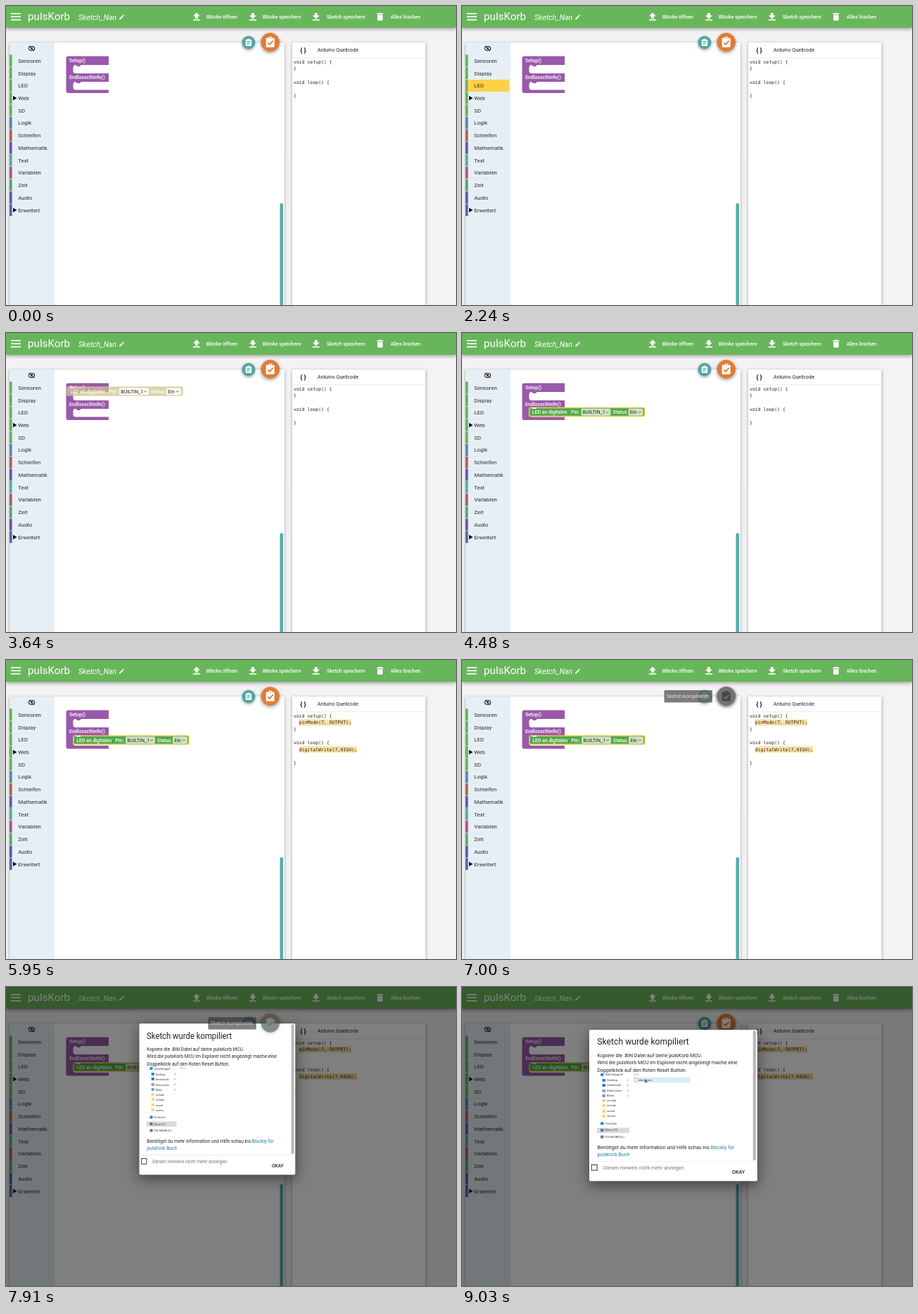
Animation of 640 by 426 pixels, one loop 9.1 s. Source, as an HTML page with a canvas:

```html
<!DOCTYPE html>
<html lang="de">
<head>
<meta charset="utf-8">
<title>Block-Editor</title>
<style>
html, body { margin: 0; width: 100%; height: 100%; overflow: hidden; background: #f3f3f3; }
canvas { display: block; }
</style>
</head>
<body>
<canvas id="stage" width="640" height="426"></canvas>
<script>
const ctx = document.getElementById('stage').getContext('2d');
const LOOP = 9100;
const SANS = 'Roboto, "Open Sans", sans-serif';
const MONO = '"DejaVu Sans Mono", "Noto Sans Mono", monospace';
const BRAND = 'pulsKorb';

const CATEGORIES = [
  ['Sensoren', '#62b45a'], ['Display', '#62b45a'], ['LED', '#62b45a'],
  ['Web', '#62b45a', true], ['SD', '#62b45a'], ['Logik', '#5b80b0'],
  ['Schleifen', '#b06055'], ['Mathematik', '#5b5bac'], ['Text', '#58aa9b'],
  ['Variablen', '#a9557f'], ['Zeit', '#5aa56e'], ['Audio', '#5e58ac'],
  ['Erweitert', '#5b62aa', true]
];

const ramp = (t, a, b) => Math.max(0, Math.min(1, (t - a) / (b - a)));
const smooth = p => p * p * (3 - 2 * p);
const mix = (a, b, p) => a + (b - a) * p;
const mixRgb = (a, b, p) => `rgb(${a.map((v, i) => Math.round(mix(v, b[i], p)))})`;

function rect(x, y, w, h, color, r = 0) {
  ctx.fillStyle = color;
  ctx.beginPath();
  ctx.roundRect(x, y, w, h, r);
  ctx.fill();
}

function circle(x, y, r, color) {
  ctx.fillStyle = color;
  ctx.beginPath();
  ctx.arc(x, y, r, 0, 7);
  ctx.fill();
}

function line(color, width, ...p) {
  ctx.strokeStyle = color;
  ctx.lineWidth = width;
  ctx.beginPath();
  for (let i = 0; i < p.length; i += 2) ctx.lineTo(p[i], p[i + 1]);
  ctx.stroke();
}

function poly(color, ...p) {
  ctx.fillStyle = color;
  ctx.beginPath();
  for (let i = 0; i < p.length; i += 2) ctx.lineTo(p[i], p[i + 1]);
  ctx.fill();
}

// y is the middle of the capital letters
function text(s, x, y, size, color, style = '', family = SANS) {
  ctx.font = `${style} ${size}px ${family}`;
  ctx.fillStyle = color;
  ctx.fillText(s, x, y + size * 0.36);
}

function shadowed(blur, dy, alpha, draw) {
  ctx.save();
  ctx.shadowColor = `rgba(0,0,0,${alpha})`;
  ctx.shadowBlur = blur;
  ctx.shadowOffsetY = dy;
  draw();
  ctx.restore();
}

function faded(alpha, draw) {
  if (alpha <= 0) return;
  ctx.save();
  ctx.globalAlpha *= alpha;
  draw();
  ctx.restore();
}

function arrowIcon(x, up) {
  const d = up ? 1 : -1, y = up ? 14.5 : 13.5;
  poly('#fff', x, y - 5 * d, x + 5, y, x + 2, y, x + 2, y + 3.5 * d,
    x - 2, y + 3.5 * d, x - 2, y, x - 5, y);
  rect(x - 5, 19, 10, 1.6, '#fff');
}

function trashIcon(x) {
  rect(x - 4.5, 10.5, 9, 1.5, '#fff');
  rect(x - 1.8, 9.6, 3.6, 1.5, '#fff');
  rect(x - 3.8, 12.8, 7.6, 8, '#fff', [0, 0, 1.2, 1.2]);
}

function header() {
  shadowed(5, 2, 0.35, () => rect(0, 0, 640, 31, '#68b65b'));
  for (const y of [10, 14.4, 18.8]) rect(7, y, 14, 1.7, '#fff');
  text(BRAND, 31, 15, 15.2, '#fff');
  text('Sketch_Nan', 103, 16, 10.6, '#fff', 'italic');
  line('#fff', 2, 161.5, 19, 166, 14.5);
  line('#fff', 2, 166.6, 13.9, 167.6, 12.9);
  arrowIcon(271, true);
  arrowIcon(351, false);
  arrowIcon(441, false);
  trashIcon(532);
  const labels = [['Blöcke öffnen', 285], ['Blöcke speichern', 365],
    ['Sketch speichern', 456], ['Alles löschen', 547]];
  for (const [s, x] of labels) text(s, x, 15, 7.1, '#fff', '500');
}

function sidebar(selected) {
  rect(5, 52, 64, 374, '#e6eff5');
  ctx.strokeStyle = '#222';
  ctx.lineWidth = 1.1;
  ctx.beginPath();
  ctx.ellipse(36.5, 60.5, 4.2, 2.9, 0, 0, 7);
  ctx.stroke();
  circle(36.5, 60.5, 1.4, '#222');
  line('#222', 1, 32.8, 56.8, 40.2, 64.2);
  CATEGORIES.forEach(([name, color, nested], i) => {
    const y = 78 + i * 17.73;
    rect(5, y - 8.6, 3.6, 17, color);
    if (name === 'LED' && selected) rect(8.6, y - 8.4, 58.4, 17, '#ffd145');
    else rect(9, y + 8.6, 59, 0.5, '#dde7ed');
    if (nested) poly('#111', 10, y - 3.3, 15.5, y, 10, y + 3.3);
    text(name, 17.3, y, 7.8, '#2b2b2b');
  });
}

function cavity(y, h) {
  rect(95.5, y, 51, h, '#fff', [3.5, 0, 0, 3.5]);
  poly('#9a59aa', 99, y - 0.2, 107, y - 0.2, 105, y + 2, 101, y + 2);
}

function programBlock(grow) {
  rect(85.5, 71.5, 60.5, 52.5 + grow, '#9a59aa', [3, 0, 0, 3]);
  cavity(84, 12);
  cavity(108, 11.4 + grow);
  text('Setup()', 90, 77.5, 7, '#fff', '500');
  text('Endlosschleife()', 90, 101.5, 7, '#fff', '500');
}

function dropdown(s, x, y, w, fill) {
  rect(x, y - 5, w, 10, fill, 2);
  text(s, x + 2.3, y, 7, '#222');
  line('#555', 0.8, x + w - 7, y - 0.8, x + w - 5, y + 1, x + w - 3, y - 0.8);
}

// (x, y) is the top left corner, solid goes from pale to full green
function ledBlock(x, y, solid, outlined) {
  ctx.save();
  ctx.translate(x, y);
  faded(mix(0.72, 1, solid), () => {
    rect(0, 0, 164, 12, mixRgb([206, 196, 146], [82, 168, 80], solid), 2);
    if (outlined) {
      ctx.strokeStyle = mixRgb([214, 202, 142], [232, 206, 58], solid);
      ctx.lineWidth = 1.5;
      ctx.stroke();
    }
    poly('#fff', 3, -0.2, 11, -0.2, 9, 1.4, 5, 1.4);
  });
  text('LED an digitalen', 4.3, 6.2, 6.9, '#fff', '500');
  text('Pin:', 59.5, 6.2, 6.9, '#fff', '500');
  text('Status', 119, 6.2, 6.9, '#fff', '500');
  const fill = mixRgb([252, 250, 242], [206, 228, 202], solid);
  dropdown('BUILTIN_1', 74, 6.2, 42, fill);
  dropdown('Ein', 141, 6.2, 21, fill);
  ctx.restore();
}

function codePanel(filled) {
  shadowed(4, 1, 0.35, () => rect(407, 52, 189.5, 380, '#fff'));
  text('{ }', 418.5, 62.5, 9, '#111', 'bold');
  text('Arduino Quellcode', 443, 62.5, 7.15, '#222');
  rect(407, 73.4, 189.5, 0.8, '#e2e2e2');
  const lines = filled
    ? ['void setup() {', '  pinMode(7, OUTPUT);', '}', '', 'void loop() {', '  digitalWrite(7,HIGH);', '', '}']
    : ['void setup() {', '}', '', 'void loop() {', '', '}'];
  lines.forEach((s, i) => {
    const y = 79.5 + i * 9.6;
    if (s.startsWith('  ')) rect(416.8, y - 4.6, (s.length - 2) * 3.92, 9, '#fbe3a4');
    text(s, 409, y, 6.5, '#222', '', MONO);
  });
}

function clipboard(x, y, s, ink, paper, check) {
  ctx.save();
  ctx.translate(x, y);
  ctx.scale(s, s);
  rect(-5, -5, 10, 11, ink, 1);
  rect(-2, -6.4, 4, 2.5, ink, 1);
  circle(0, -4.9, 0.7, paper);
  if (check) line(paper, 1.5, -2.8, 0.8, -0.8, 2.8, 3.2, -1.6);
  else for (const [dy, w] of [[-2.4, 6], [0, 6], [2.4, 4]]) rect(-3, dy, w, 1.2, paper);
  ctx.restore();
}

function roundButtons() {
  shadowed(4, 1.5, 0.4, () => circle(345, 52, 9.3, '#4fa5a3'));
  clipboard(345, 52, 0.85, '#fff', '#4fa5a3', false);
  shadowed(5, 2, 0.4, () => circle(375.8, 51.5, 13.2, '#e27c35'));
  clipboard(375.8, 51.5, 1.2, '#fff', '#e27c35', true);
}

function pressedButton(dark) {
  const tone = mixRgb([116, 116, 116], [92, 106, 106], dark);
  shadowed(5, 1, 0.35, () => circle(375.8, 51.5, 13.2, tone));
  clipboard(375.8, 51.5, 1.2, mixRgb([70, 72, 72], [130, 144, 144], dark), tone, true);
}

function tooltip(dark) {
  rect(287.5, 43, 68.5, 17.5, mixRgb([92, 92, 92], [52, 52, 52], dark), 1.5);
  text('Sketch kompilieren', 291, 51.7, 7.15, '#fff');
}

function explorer(t) {
  const list = [['Schnellzugriff', 125, '#3f8fd0'], ['Desktop', 133, '#2f86c9'],
    ['Downloads', 140, '#3a76b5'], ['Dokumente', 148, '#8aa0b5'], ['Bilder', 155, '#6fa3c7'],
    ['include', 162, '#f5d67a'], ['include', 169, '#f5d67a'], ['sound', 177, '#f5d67a'],
    ['source', 184, '#f5d67a'], ['FernFach', 194.5, '#2d86c8'],
    ['Dieser PC', 204, '#4a7fae'], ['PULSKORB (E:)', 213.5, '#777']];
  rect(192, 200.5, 46, 7.5, '#d9d9d9');
  list.forEach(([s, y, color], i) => {
    const sub = i > 0 && i < 9;
    rect(sub ? 199.5 : 197, y - 2, 4.5, 4, color, 0.5);
    text(s, sub ? 206 : 203.5, y, 4.1, '#333');
    if (i > 0 && i < 5) line('#777', 0.8, 234.5, y + 1.3, 237, y - 1.3);
  });
  text('Name', 244, 125, 3.2, '#aaa');
  faded(ramp(t, 8250, 8320), () => {
    rect(244, 128.8, 80, 7.4, '#d6ebfa');
    rect(245.5, 130, 3.6, 5, '#fff');
    ctx.strokeStyle = '#999';
    ctx.lineWidth = 0.5;
    ctx.strokeRect(245.5, 130, 3.6, 5);
    text('sketch.bin', 251, 132.5, 4.1, '#333');
    poly('#444', 260.5, 131, 260.5, 137, 262, 135.6, 264, 135.2);
  });
}

function dialog(t) {
  const p = smooth(ramp(t, 7780, 8050));
  ctx.save();
  ctx.translate(300.3, mix(-17, 0, p));
  ctx.scale(mix(0.862, 1, p), 1);
  ctx.translate(-300.3, 0);
  shadowed(20, 6, 0.5, () => rect(181, 61, 239, 215.5, '#fff', 2));
  text('Sketch wurde kompiliert', 192.3, 78, 12.2, '#222');
  text(`Kopiere die .BIN Datei auf deine ${BRAND} MCU.`, 192.5, 97.3, 7.15, '#222');
  text(`Wird die ${BRAND} MCU im Explorer nicht angezeigt mache eine`, 192.5, 107.7, 7.15, '#222');
  text('Doppelklick auf den Roten Reset Button.', 192.5, 118.2, 7.15, '#222');
  explorer(t);
  const lead = 'Benötigst du mehr Information und Hilfe schau ins ';
  text(lead, 192.5, 228, 7.15, '#222');
  text('Blockly für', 192.5 + ctx.measureText(lead).width, 228, 7.15, '#1c7f9c');
  text(`${BRAND} Buch`, 192.5, 238.4, 7.15, '#1c7f9c');
  rect(181, 248, 239, 0.6, '#e4e4e4');
  rect(413.8, 62, 4.4, 185, '#b9b9b9', 2);
  ctx.strokeStyle = '#444';
  ctx.lineWidth = 1.1;
  ctx.strokeRect(184.3, 253.3, 7.8, 7.8);
  text('Diesen Hinweis nicht mehr anzeigen', 201, 257.5, 7.15, '#777');
  text('OKAY', 384, 263.3, 7.2, '#222', '500');
  ctx.restore();
}

function workspace(t) {
  const picked = t >= 1820 && t < 3500;
  const placed = t >= 4700;
  const dragging = t >= 3500 && !placed;
  shadowed(4, 1, 0.35, () => rect(5, 52, 391, 380, '#fff'));
  sidebar(picked);
  programBlock(placed ? 2.5 : 0);
  if (t >= 2310 && t < 3500) {
    faded(0.8, () => rect(69, 52, 202, 374, '#ddd'));
    ledBlock(87, 77, 1, false);
  }
  if (t >= 3500) {
    const p = smooth(ramp(t, 3700, 4600));
    ledBlock(mix(87, 96, p), mix(77, 108, p), ramp(t, 3660, 3900), true);
  }
  const top = dragging ? 285 : 281;
  rect(389.6, top, 4.6, 450 - top, '#5aacac', 2.3);
  for (let y = 218; y < 284; y += 4) rect(400.5, y, 1, 1, '#d4d4d4');
  codePanel(placed);
}

function draw(t) {
  const open = ramp(t, 7640, 7870);
  const release = 1 - ramp(t, 7820, 8080);
  rect(0, 0, 640, 426, '#f3f3f3');
  header();
  workspace(t);
  roundButtons();
  if (open > 0) {
    faded(open * 0.5, () => rect(0, 0, 640, 426, '#000'));
    faded(open, () => dialog(t));
  }
  faded(ramp(t, 6700, 6940) * release, () => pressedButton(open));
  faded(ramp(t, 6850, 7030) * 0.96 * release, () => tooltip(open));
}

function tick(now) {
  draw(now % LOOP);
  requestAnimationFrame(tick);
}
draw(0);
requestAnimationFrame(tick);
</script>
</body>
</html>
```
